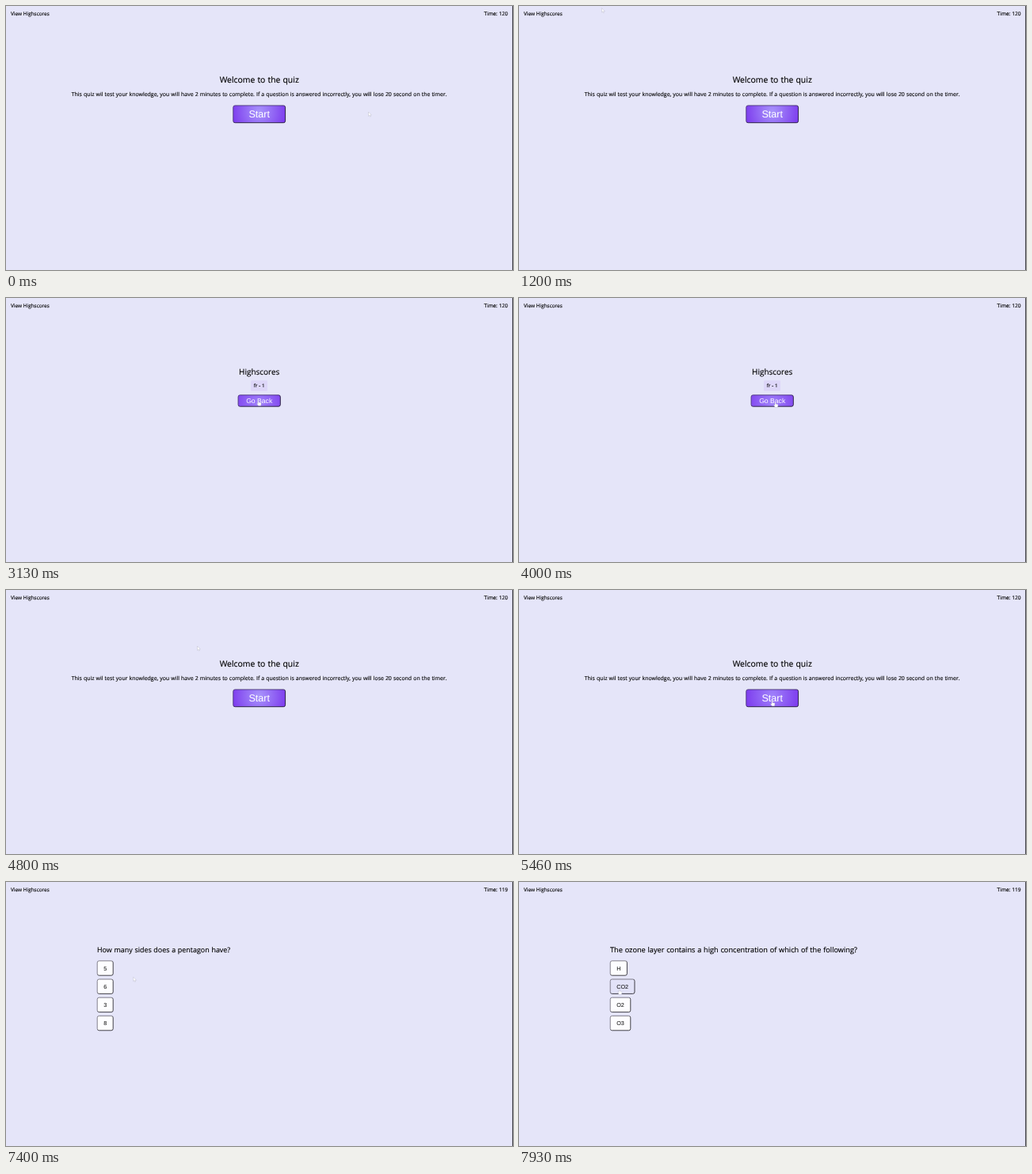
Recreate the animation shown at these times as an HTML page. Size 640 by 334 pixels, loop 8 s.

```html
<!DOCTYPE html>
<html lang="en">
<head>
<meta charset="utf-8">
<title>Quiz</title>
<style>
  html, body { margin: 0; width: 100%; height: 100%; overflow: hidden; background: #e5e5f9; }
  svg { display: block; width: 100%; height: 100%; }
  text {
    font-family: "Open Sans", "Noto Sans", sans-serif; word-spacing: .04em;
    fill: #000; stroke: #000; stroke-width: .14px; text-rendering: geometricPrecision;
  }
  .button text { font-family: "Liberation Sans", Arial, sans-serif; word-spacing: 0; stroke: none; }
  .purple text { fill: #fff; }
  .purple rect { stroke: url(#purpleEdge); fill: url(#idle); }
  .purple.over rect { fill: url(#hover); }
  .plain rect { stroke: url(#plainEdge); fill: #fdfdff; }
  .plain.over rect { fill: #e2e2f8; }
  .linked { fill: #24148c; stroke: #24148c; }
  .pointer { fill: #fff; stroke: #a9a9ba; stroke-width: .35px; stroke-linejoin: round; }
</style>
</head>
<body>
<svg id="stage" viewBox="0 0 640 334">
  <defs>
    <radialGradient id="idle" gradientUnits="userSpaceOnUse" cx="319.7" cy="134" r="35">
      <stop offset="0" stop-color="#a996fc"/><stop offset="1" stop-color="#7c3aed"/>
    </radialGradient>
    <radialGradient id="hover" gradientUnits="userSpaceOnUse" cx="319.7" cy="134" r="35">
      <stop offset="0" stop-color="#a083fb"/><stop offset="1" stop-color="#7c3aed"/>
    </radialGradient>
    <linearGradient id="purpleEdge" x2="1" y2="1">
      <stop offset=".45" stop-color="#3b2a68"/><stop offset=".55" stop-color="#0c0818"/>
    </linearGradient>
    <linearGradient id="plainEdge" x2="1" y2="1">
      <stop offset=".45" stop-color="#66636f"/><stop offset=".55" stop-color="#141218"/>
    </linearGradient>
  </defs>
  <rect width="640" height="334" fill="#e5e5f9"/>
</svg>
<script>
const LOOP = 8000, STEP = 200 / 3, CENTER = 319.7, BODY = 6.95;
const stage = document.getElementById('stage');

function add(parent, tag, attrs, content = '') {
  const el = document.createElementNS('http://www.w3.org/2000/svg', tag);
  for (const key in attrs) el.setAttribute(key, attrs[key]);
  el.textContent = content;
  return parent.appendChild(el);
}

function label(parent, content, x, y, size, anchor = 'start') {
  return add(parent, 'text', { x, y, 'font-size': size, 'text-anchor': anchor }, content);
}

const inside = (px, py, x, y, w, h) => px >= x && px <= x + w && py >= y && py <= y + h;

// Sized by its text plus padding; centred unless a left edge is given.
function button(parent, content, { left, top, height, size, padding, kind }) {
  const g = add(parent, 'g', { class: 'button ' + kind });
  const box = add(g, 'rect', { y: top + .4, height: height - .8, rx: 2.3, 'stroke-width': .8 });
  const text = label(g, content, 0, top + height / 2 + size * .355, size, 'middle');
  const width = text.getComputedTextLength() + padding;
  const x = left ?? CENTER - width / 2;
  box.setAttribute('x', x + .4);
  box.setAttribute('width', width - .8);
  text.setAttribute('x', x + width / 2);
  return (px, py) => {
    const over = inside(px, py, x, top, width, height);
    g.classList.toggle('over', over);
    return over;
  };
}

function page(start, build) {
  const group = add(stage, 'g', {});
  return { start, group, buttons: build(group) };
}

function question(start, content, size, answers) {
  return page(start, g => {
    label(g, content, 115, 89.1, size);
    return answers.map((answer, i) => button(g, answer,
      { left: 114.8, top: 99.4 + i * 23.2, height: 19.2, size: 7.2, padding: 16.8, kind: 'plain' }));
  });
}

function welcome(start) {
  return page(start, g => {
    label(g, 'Welcome to the quiz', CENTER, 97.3, BODY * 1.5, 'middle');
    label(g, 'This quiz wil test your knowledge, you will have 2 minutes to complete. If a question is answered incorrectly, you will lose 20 second on the timer.',
      CENTER, 113.6, BODY, 'middle');
    return [button(g, 'Start', { top: 125.5, height: 22.6, size: 12.6, padding: 40, kind: 'purple' })];
  });
}

function highscores(start) {
  return page(start, g => {
    label(g, 'Highscores', CENTER, 97.3, 10, 'middle');
    add(g, 'rect', { x: 309, y: 104.2, width: 21, height: 13.6, rx: 1.2, fill: '#ddd6f8' });
    label(g, 'fr - 1', CENTER, 113.3, 6.25, 'middle');
    return [button(g, 'Go Back', { top: 122.4, height: 15.2, size: 8.64, padding: 21, kind: 'purple' })];
  });
}

const link = label(stage, 'View Highscores', 6, 11.6, 6.42);
const timer = label(stage, '', 633.6, 11.6, 6.55, 'end');
const pages = [
  welcome(0),
  highscores(2260),
  welcome(4060),
  question(6130, 'How many sides does a pentagon have?', 8.95, ['5', '6', '3', '8']),
  question(7930, 'The ozone layer contains a high concentration of which of the following?', 9.2, ['H', 'CO2', 'O2', 'O3'])
];

const arrow = add(stage, 'path', { class: 'pointer', d: 'M0 0V5.3L1.2 4.2 2 6.1 2.9 5.7 2.1 3.9H3.8Z' });
const hand = add(stage, 'path', {
  class: 'pointer',
  d: 'M-.5 .4Q0-.3 .5 .4V2.4L3 3Q3.6 3.2 3.5 4L3 6.8H-.2L-1.9 4.3Q-2 3.5-1.2 3.7L-.5 4.3Z'
});
add(stage, 'rect', { x: 639, width: 1, height: 334, fill: '#45454d' });

// Each move eases the pointer from wherever it rests to a new spot.
const home = { x: 457.5, y: 134 };
const moves = [
  { from: 0, to: 400, x: 272.5, y: 93.5 },
  { from: 600, to: 860, x: 411, y: 132 },
  { from: 860, to: 1200, x: 104.5, y: 2.7 },
  { from: 1200, to: 1460, x: 362, y: 125 },
  { from: 1460, to: 1660, x: 34.5, y: 11 },
  { from: 2330, to: 3200, x: 323.5, y: 131.5 },
  { from: 4130, to: 4800, x: 241.5, y: 71 },
  { from: 4800, to: 5000, x: 225, y: 80 },
  { from: 5000, to: 5460, x: 319.5, y: 140 },
  { from: 6600, to: 7460, x: 158.5, y: 120 },
  { from: 7460, to: 7930, x: 126.5, y: 135.5 }
];

function pointerAt(t) {
  let { x, y } = home;
  for (const move of moves) {
    const k = Math.min(1, Math.max(0, (t - move.from) / (move.to - move.from)));
    const eased = k * k * (3 - 2 * k);
    x += (move.x - x) * eased;
    y += (move.y - y) * eased;
  }
  return [x, y];
}

function render(ms) {
  // The screen refreshes fifteen times a second.
  const [x, y] = pointerAt(Math.floor((ms + 7) / STEP) * STEP);
  const current = pages.filter(p => p.start <= ms).pop();
  for (const p of pages) p.group.setAttribute('display', p === current ? 'inline' : 'none');

  const onLink = inside(x, y, 6, 5, 49, 9);
  const onButton = current.buttons.filter(hover => hover(x, y)).length > 0;
  const pointing = onLink || onButton;
  link.classList.toggle('linked', onLink);
  timer.textContent = 'Time: ' + (ms < 7130 ? 120 : 119);

  arrow.setAttribute('display', pointing ? 'none' : 'inline');
  hand.setAttribute('display', pointing ? 'inline' : 'none');
  (pointing ? hand : arrow).setAttribute('transform', `translate(${x} ${y})`);
}

const began = performance.now();
function tick() {
  render((performance.now() - began) % LOOP);
  requestAnimationFrame(tick);
}
tick();
</script>
</body>
</html>
```
